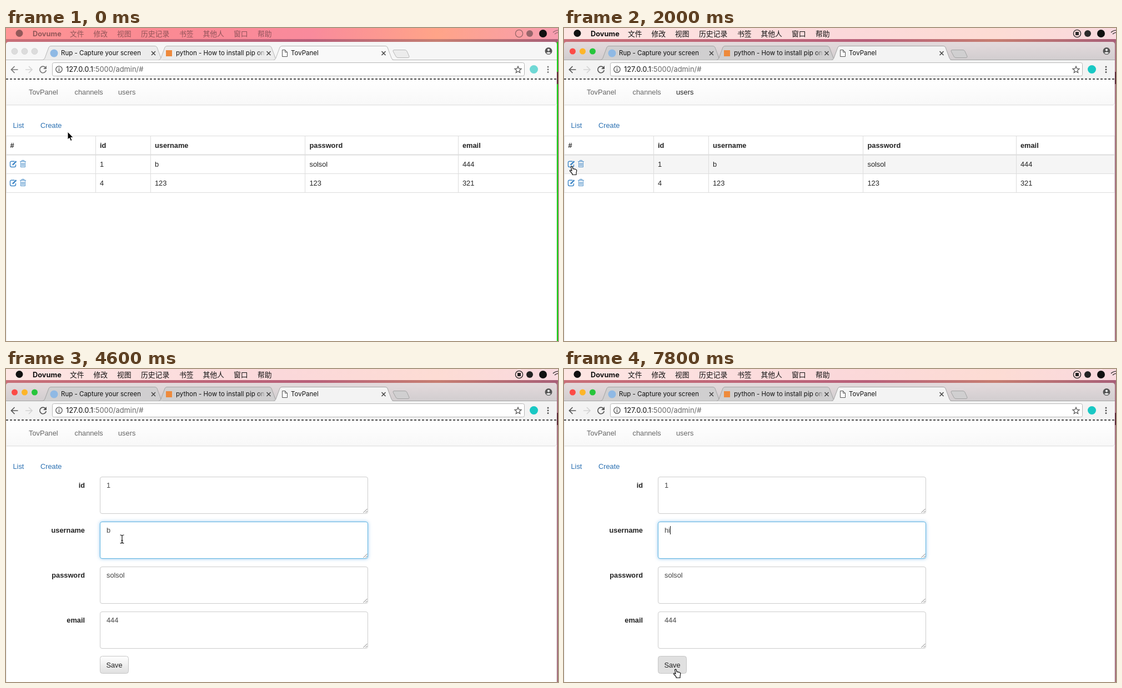
An HTML page that plays this animation: 994x564 px, repeating every 8 s.

```html
<!DOCTYPE html>
<html lang="en">
<head>
<meta charset="utf-8">
<title>Admin panel demo</title>
<style>
  html, body { margin: 0; width: 100%; height: 100%; overflow: hidden; background: #fff; }
  svg { display: block; width: 994px; height: 564px; font: 12.8px "Liberation Sans", Arial, sans-serif; fill: #222;
    --strip: #f6f6f6; --tab: #ececec; --bar: #f9f9f9; --icon: #777; --edge: #b8b8b8; --badge: #6fd8d5; }
  svg.active { --strip: url(#strip); --tab: #d0cfd0; --bar: #f3f3f3; --icon: #555; --edge: #a4a4a4; --badge: #19c8c4; }
  text { white-space: pre; }
  .ui { font-family: Inter, Roboto, sans-serif; fill: #111; }
  .menu { font-family: Inter, "Noto Sans CJK SC", "Noto Sans CJK", sans-serif; fill: #111; }
  .b { font-weight: bold; }
  .nav { fill: #666; }
  .link { fill: #2a70b2; }
  .line { fill: none; stroke: var(--icon); stroke-width: 1.7; }
  .glyph { fill: none; stroke: #3f87c6; stroke-width: 1.4; }
  .field { fill: #fff; stroke: #ccc; }
  .tab { fill: var(--tab); stroke: var(--edge); }
  .light { fill: #dcdcdc; stroke: #c9c9c9; stroke-width: .6; }
  .active .light { fill: var(--c); stroke: none; }
</style>
</head>
<body>
<svg id="stage" viewBox="0 0 994 564">
  <defs>
    <linearGradient id="red"><stop stop-color="#ff9696"/><stop offset=".25" stop-color="#fb8a92"/><stop offset=".55" stop-color="#f98a9c"/><stop offset=".78" stop-color="#ffa488"/><stop offset="1" stop-color="#f79db0"/></linearGradient>
    <linearGradient id="pink"><stop stop-color="#fde6e3"/><stop offset=".5" stop-color="#fbd8da"/><stop offset=".78" stop-color="#fddcd4"/><stop offset="1" stop-color="#f9d9df"/></linearGradient>
    <linearGradient id="wall"><stop stop-color="#c86f78"/><stop offset=".55" stop-color="#b8607a"/><stop offset=".78" stop-color="#c67e72"/><stop offset="1" stop-color="#a85f78"/></linearGradient>
    <linearGradient id="strip" x2="0" y2="1"><stop stop-color="#e4dadc"/><stop offset="1" stop-color="#d1cdcf"/></linearGradient>
    <linearGradient id="navbar" x2="0" y2="1"><stop stop-color="#fff"/><stop offset="1" stop-color="#f8f8f8"/></linearGradient>
    <linearGradient id="button" x2="0" y2="1"><stop stop-color="#fff"/><stop offset="1" stop-color="#e0e0e0"/></linearGradient>
    <linearGradient id="fade" gradientUnits="userSpaceOnUse" x1="452" x2="468"><stop stop-color="#fff"/><stop offset="1" stop-color="#000"/></linearGradient>
    <mask id="cut"><rect x="300" y="30" width="168" height="28" fill="url(#fade)"/></mask>
    <g id="edit" class="glyph">
      <path d="M9 1.7H3.5Q1 1.7 1 4V9.5Q1 12 3.5 12H8.5Q11 12 11 9.5V7.5"/>
      <path d="M5.3 8.3 12 1.6" stroke-width="2.5"/>
    </g>
    <path id="trash" class="glyph" style="stroke-width:.9" d="M0 2.5H11M3.5 2.5V.5H7.5V2.5M1.5 3.5V12.5H9.5V3.5M3.5 5V11M5.5 5V11M7.5 5V11"/>
    <path id="close" d="M-3.5-3.5l7 7m0-7l-7 7" stroke="#444" stroke-width="1.5"/>
  </defs>

  <!-- menu bar -->
  <rect width="994" height="564" fill="url(#wall)"/>
  <rect id="menuBar" width="994" height="20"/>
  <g id="menuText" class="menu"></g>
  <g id="menuIcons" fill="none" stroke="#222" stroke-width="1.3">
    <circle cx="924" cy="10" r="6.6"/>
    <rect id="stop" x="921" y="7" width="6" height="6" fill="#222" stroke="none"/>
    <circle cx="943" cy="10" r="6" fill="#222" stroke="none"/>
    <path d="M985 8q4-4 10-4M988 11q3-3 7-3"/>
  </g>
  <circle cx="967" cy="10" r="7" fill="#111"/>

  <!-- window -->
  <path d="M0 30Q0 25 5 25H987Q992 25 992 30V58H0Z" style="fill:var(--strip)"/>
  <rect id="side" x="992" y="25" width="2" height="539"/>
  <rect x="992" y="79" width="2" height="22" fill="#5a2434"/>
  <circle class="light" cx="15.500" cy="42" r="5.500" style="--c:#fc4a46"/>
  <circle class="light" cx="33.500" cy="42" r="5.500" style="--c:#fdb529"/>
  <circle class="light" cx="51.500" cy="42" r="5.500" style="--c:#27c53b"/>
  <rect y="58" width="992" height="34" style="fill:var(--bar)"/>
  <path d="M0 57.500H992" style="stroke:var(--edge)"/>
  <g id="tabs"></g>
  <path class="tab" d="M699 39.500H718Q721 39.500 722 42L726 51Q726.500 53.500 724 53.500H706Q703 53.500 702 51L697 42Q696.500 39.500 699 39.500Z"/>
  <circle cx="86.500" cy="45.500" r="7" fill="#8fb9e4"/>
  <rect x="288" y="40" width="11" height="11" fill="#ee8a3c"/>
  <path d="M497.500 39.500H502.500L506.500 43.500V51.500H497.500ZM502.500 39.500V43.500H506.500" fill="#fff" stroke="#555"/>
  <g class="ui" font-size="11.500">
    <text x="99" y="49">Rup - Capture your screen</text>
    <text x="306" y="49" mask="url(#cut)">python - How to install pip on M</text>
    <text x="513" y="49">TovPanel</text>
  </g>
  <use href="#close" x="265.500" y="45.500"/><use href="#close" x="473" y="45.500"/><use href="#close" x="680" y="45.500"/>
  <circle cx="977" cy="41.500" r="6.500" fill="#555"/>
  <circle cx="977" cy="39.500" r="2.100" fill="#eee"/>
  <path d="M972.800 44.800Q977 41.500 981.200 44.800Q977 48.500 972.800 44.800Z" fill="#eee"/>

  <!-- toolbar -->
  <path class="line" d="M21.500 75H10M15.500 69L9.500 75L15.500 81"/>
  <path d="M35 75H46.500M41 69L47 75L41 81" fill="none" stroke="#d4d4d4" stroke-width="1.700"/>
  <path class="line" d="M71.300 71.500A5.800 5.800 0 1 0 72.300 76"/>
  <path d="M73 68V74H67Z" style="fill:var(--icon)"/>
  <rect x="83.500" y="62.500" width="850" height="24" rx="3" fill="#fff" stroke="#b8b8b8"/>
  <circle cx="95.500" cy="74.500" r="5.700" fill="none" stroke="#555" stroke-width="1.300"/>
  <path d="M95.500 73.500V78M95.500 71V72.400" stroke="#555" stroke-width="1.400"/>
  <text class="ui" x="108" y="79" font-size="12.900">127.0.0.1<tspan fill="#666">:5000/admin/#</tspan></text>
  <path d="M922 69L923.700 73.100L928 73.400L924.700 76.200L925.700 80.500L922 78.200L918.300 80.500L919.300 76.200L916 73.400L920.300 73.100Z" fill="none" stroke="#555" stroke-width="1.200"/>
  <circle cx="950.500" cy="74.500" r="7.500" style="fill:var(--badge)"/>
  <path d="M976 70V80" stroke-width="3" stroke-linecap="round" stroke-dasharray="0 4.800" style="stroke:var(--icon)"/>

  <!-- page -->
  <rect y="91" width="992" height="473" fill="#fff"/>
  <rect y="93" width="992" height="45" fill="url(#navbar)"/>
  <path d="M0 138.500H988Q991.500 138.500 991.500 135V93" fill="none" stroke="#e3e3e3"/>
  <path d="M0 139.500H990" stroke="#f4f4f4"/>
  <path d="M.500 93V564M991.500 139V564" stroke="#ebebeb"/>
  <path d="M0 92H992" stroke="#111" stroke-width="1.300" stroke-dasharray="4 3"/>
  <g class="nav">
    <text x="41" y="120">TovPanel</text>
    <text x="123.500" y="120">channels</text>
    <text id="users" x="202" y="120">users</text>
  </g>
  <g class="link"><text x="12.500" y="180">List</text><text x="62" y="180">Create</text></g>
  <g id="list"></g>
  <g id="form">
    <g id="fields"></g>
    <rect id="save" x="169.500" y="517.500" width="51" height="31" rx="4" stroke="#c6c6c6"/>
    <text x="195" y="537.500" text-anchor="middle">Save</text>
    <path id="caret" d="M0 283V298" stroke="#111"/>
  </g>

  <!-- pointers, hot spot at the origin -->
  <path id="arrow" d="M0 0V14L3.200 11.200L5.500 16.500L8 15.400L5.700 10.300H10Z" fill="#000" stroke="#fff"/>
  <g id="beam" fill="none" stroke="#111" stroke-width="1.200">
    <path d="M-3.500-7.500Q0-7.500 0-5.500Q0-7.500 3.500-7.500M0-6V6M-3.500 7.500Q0 7.500 0 5.500Q0 7.500 3.500 7.500M-1.800 2.500H1.800"/>
  </g>
  <path id="hand" d="M-1.500.800Q0-.800 1.200 1L2.200 5Q3.500 4 4.700 5.300Q6 4.600 6.900 6Q8.800 5.800 8.800 8L8 13V15.500H1V13.500L-3.500 8.500Q-3.500 6.500-1.500 7.300L.100 8.500Z" fill="#fff" stroke="#111" stroke-width="1.200" stroke-linejoin="round"/>
</svg>
<script>
const $ = id => document.getElementById(id);
const text = (x, y, s, cls = '', anchor = 'start') =>
  `<text x="${x}" y="${y}" class="${cls}" text-anchor="${anchor}">${s}</text>`;

const menu = [[48, 'Dovume'], [115, '文件'], [157.5, '修改'], [200, '视图'], [243, '历史记录'],
  [312, '书签'], [354.5, '其他人'], [410, '窗口'], [453, '帮助']];
$('menuText').innerHTML = '<circle cx="24" cy="9.500" r="6.500"/>' +
  menu.map(([x, s], i) => text(x, 14.5, s, i ? '' : 'b')).join('');

const tab = (l, r, style = '') => `<path class="tab" style="${style}" d="M${l} 57.5Q${l + 3} 57 ${l + 4} 54
  L${l + 11} 35Q${l + 12} 32.500 ${l + 15} 32.500H${r - 15}Q${r - 12} 32.500 ${r - 11} 35L${r - 4} 54Q${r - 3} 57 ${r} 57.500"/>`;
$('tabs').innerHTML = tab(66, 283) + tab(275, 489) + tab(482, 698, 'fill:var(--bar)') +
  '<rect x="485" y="57" width="210" height="2" style="fill:var(--bar)"/>';

const names = ['id', 'username', 'password', 'email'];
const rows = [['1', 'b', 'solsol', '444'], ['4', '123', '123', '321']];
const columns = [169, 268, 546.5, 822];
const cells = (values, y, cls) => values.map((s, i) => text(columns[i], y, s, cls)).join('');
$('list').innerHTML = `<rect id="hover" x="1" y="229" width="990" height="33" fill="#f5f5f5"/>
  <path d="M0 194.500H992M0 262.500H992M0 296.500H992M.500 194V297` +
  columns.map(x => `M${Math.floor(x) - 7.5} 194V297`).join('') +
  'M991.500 194V297" stroke="#ddd" fill="none"/><path d="M0 228.500H992" stroke="#ddd" stroke-width="1.800"/>' +
  text(7.5, 215.5, '#', 'b') + cells(names, 215.5, 'b') +
  rows.map((r, i) => cells(r, 250 + 34 * i) +
    `<use href="#edit" x="6.500" y="${238.5 + 34 * i}"/><use href="#trash" x="25" y="${238 + 34 * i}"/>`).join('');

$('fields').innerHTML = names.map((name, i) => {
  const y = 194.5 + 81 * i;
  return text(142, y + 19.5, name, 'b', 'end') +
    `<rect id="box-${name}" class="field" x="169.500" y="${y}" width="482" height="66" rx="3.500"/>
     <path d="M643.500 ${y + 64.5}l7-7m-3 7l3-3" stroke="#777"/>
     <text id="value-${name}" x="181" y="${y + 19.5}" fill="#444">${rows[0][i]}</text>`;
}).join('');

// pointer stops: time, x, y
const path = [[0, 111, 187], [70, 87, 234], [330, 87, 234], [530, 32, 262], [730, 32, 266], [1270, 14, 249],
  [2270, 14, 249], [2600, 3, 245], [3070, 9.5, 246], [3470, 9.5, 246], [4270, 209, 306.5], [7000, 209, 306.5], [7800, 201, 541]];

function pointerAt(t) {
  const n = path.findIndex(p => p[0] > t);
  if (n < 0) return path.at(-1).slice(1);
  const [t0, x0, y0] = path[n - 1], [t1, x1, y1] = path[n];
  const k = (t - t0) / (t1 - t0), e = k * k * (3 - 2 * k);
  return [x0 + (x1 - x0) * e, y0 + (y1 - y0) * e];
}

const during = (t, ...spans) => spans.some(([a, b]) => t >= a && t < b);
const show = (id, on) => $(id).style.display = on ? '' : 'none';
const paint = (id, value) => $(id).style.fill = value;

function draw(t) {
  const woken = t >= 1800, active = t >= 1930, editing = t >= 3130;
  $('stage').classList.toggle('active', active);
  paint('menuBar', woken ? 'url(#pink)' : 'url(#red)');
  paint('side', t < 330 ? '#12d012' : '#a8717f');
  $('menuText').style.opacity = woken ? 1 : .45;
  $('menuIcons').style.opacity = woken ? Math.min(1, .45 + (t - 1800) / 400) : .45;
  show('stop', woken);

  paint('users', active && !editing ? '#222' : '#666');
  show('list', !editing);
  show('form', editing);
  show('hover', active);

  const focus = t < 4330 ? 0 : t < 4400 ? .5 : 1, box = $('box-username').style;
  box.stroke = ['#ccc', '#99bedb', '#5fb3e0'][focus * 2];
  box.filter = focus ? `drop-shadow(0 0 3px rgba(102,175,233,${.7 * focus}))` : '';
  const value = t < 5270 ? 'b' : t < 6400 ? '' : t < 6600 ? 'h' : 'hi';
  $('value-username').textContent = value;
  show('caret', during(t, [4330, 4600], [5000, 5800], [6270, 7170], [7670, 8000]));
  $('caret').setAttribute('transform', `translate(${{ '': 181.5, hi: 191.5 }[value] ?? 188.5})`);

  const [x, y] = pointerAt(t);
  const onSave = editing && x > 169 && x < 221 && y > 517 && y < 549;
  const onIcon = active && !editing && x >= 7;
  const onField = editing && x > 169 && x < 652 && y < 504 && (y - 194) % 81 < 67;
  const kind = during(t, [5270, 7000]) ? '' : onSave || onIcon ? 'hand' : onField ? 'beam' : 'arrow';
  for (const id of ['arrow', 'beam', 'hand']) {
    show(id, id === kind);
    $(id).setAttribute('transform', `translate(${x} ${y})`);
  }
  paint('save', onSave ? '#e0e0e0' : 'url(#button)');
}

const start = performance.now();
function frame() {
  const ms = (performance.now() - start) % 8000;
  draw(Math.round(Math.floor((ms + 3.4) * 15 / 1000) * 20 / 3) * 10);
  requestAnimationFrame(frame);
}
frame();
</script>
</body>
</html>
```
